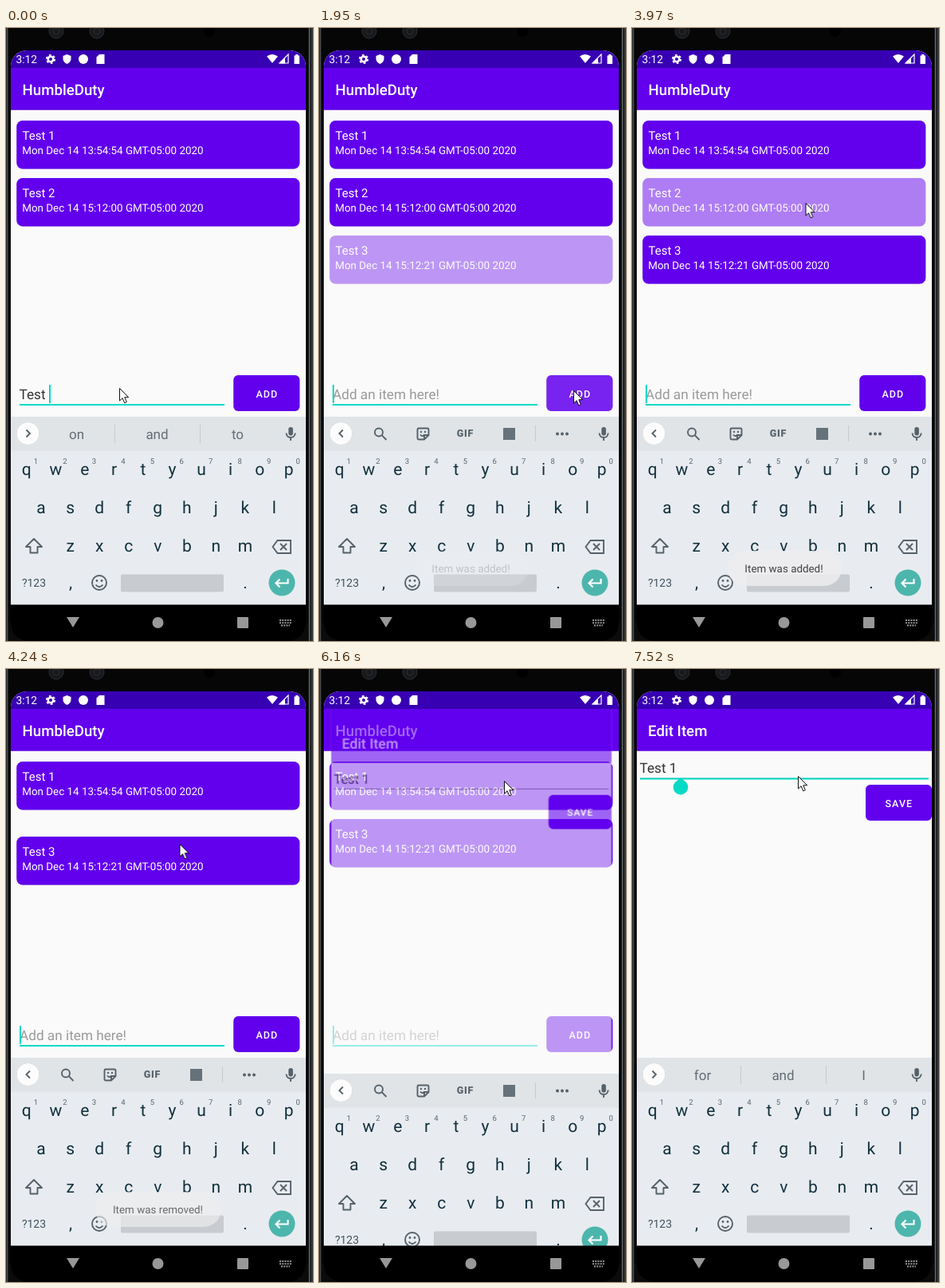
An HTML page that plays this animation: 385x768 px, repeating every 8 s.

```html
<!DOCTYPE html>
<html lang="en">
<head>
<meta charset="utf-8">
<title>Todo list demo</title>
<style>
html, body { margin: 0; width: 100%; height: 100%; overflow: hidden; background: #000; }
svg { display: block; width: 385px; height: 768px; }
text { font-family: Roboto, sans-serif; text-rendering: geometricPrecision; white-space: pre; }
.mid { text-anchor: middle; }
.bar { font-size: 18.7px; font-weight: 500; fill: #fff; }
.title { font-size: 15px; fill: #fff; }
.date { font-size: 13.42px; fill: #fff; }
.field { font-size: 17.2px; fill: #333; }
.hint { font-size: 17.2px; fill: #9a9a9a; }
.btn { font-size: 12.5px; font-weight: 500; letter-spacing: 1px; fill: #fff; }
.key { font-size: 21px; fill: #12303d; }
.num { font-size: 9.5px; fill: #56656d; }
.word { font-size: 17px; fill: #636d74; }
.toast text { font-size: 13.4px; fill: #222; }
.line { fill: none; stroke: #56626a; stroke-width: 1.9; }
.raised { filter: drop-shadow(0 .6px .7px #0004); }

[class*="go-"] { animation: 8s step-end -20ms infinite; }
.go-mouse { animation-name: mouse; }
.go-caret { animation-name: caret; }
.go-typed { visibility: hidden; animation-name: typed; }
.go-entry { animation-name: entry; }
.go-hint { opacity: 0; animation-name: hint; }
.go-press { opacity: 0; animation-name: press; }
.go-second { animation-name: second; }
.go-third { opacity: 0; transform: translateY(72px); animation-name: third; }
.go-hold { opacity: 0; animation-name: hold; }
.go-tap { opacity: 0; animation-name: tap; }
.go-added { opacity: 0; animation-name: added; }
.go-removed { opacity: 0; animation-name: removed; }
.go-words { animation-name: words; }
.go-tools { opacity: 0; animation-name: tools; }
.go-words2 { opacity: 0; animation-name: words2; }
.go-keys { animation-name: keys; }
.go-edit { opacity: 0; transform-origin: 191px 400px; animation-name: edit; }
.go-focus { opacity: 0; animation-name: focus; }
.go-caret2 { opacity: 0; animation-name: caret2; }
.go-handle { opacity: 0; animation-name: handle; }
.go-back { transform-origin: 84px 744.5px; animation-name: back; }
.go-switch { animation-name: switch; }

@keyframes mouse {
  0% { transform: translate(142px, 451px); }
  12.75% { transform: translate(205px, 456px); }
  14.25% { transform: translate(285px, 457px); }
  15.75% { transform: translate(319px, 454px); }
  34.125% { transform: translate(318px, 454px); }
  35.625% { transform: translate(302px, 408px); }
  37.125% { transform: translate(265px, 320px); }
  38.75% { transform: translate(231px, 248px); }
  40.25% { transform: translate(218px, 222px); }
  42% { transform: translate(217.5px, 219px); }
  63.25% { transform: translate(231px, 176px); }
  65.125% { transform: translate(232px, 147px); }
  66.625% { transform: translate(232px, 140px); }
  81.875% { transform: translate(224px, 147px); }
  83.5% { transform: translate(215px, 151px); }
  85.375%, to { transform: translate(208px, 134px); }
}
@keyframes caret {
  0% { opacity: 1; transform: translateX(54px); }
  5.875% { opacity: 0; transform: translateX(54px); }
  11.25% { opacity: 1; transform: translateX(64px); }
  17.5% { opacity: 0; transform: translateX(64px); }
  24.375%, 35.625%, 48.125%, 59.75%, 71.625%, to { opacity: 1; transform: translateX(17px); }
  29.125%, 42%, 54.625%, 66.625% { opacity: 0; transform: translateX(17px); }
}
@keyframes typed { 11.25% { visibility: visible; } 24.375%, to { visibility: hidden; } }
@keyframes entry { 24.375%, to { opacity: 0; } }
@keyframes hint { 24.375%, to { opacity: 1; } }
@keyframes press { 22.75% { opacity: .2; } 24.375% { opacity: .14; } 26.125% { opacity: .05; } 27.625%, to { opacity: 0; } }
@keyframes second { 49.625% { opacity: .5; } 51.5%, to { opacity: 0; } }
@keyframes third {
  24.375% { opacity: .4; transform: translateY(72px); }
  26.125% { opacity: 1; transform: translateY(72px); }
  51.5% { opacity: 1; transform: translateY(64px); }
  53% { opacity: 1; transform: translateY(22px); }
  54.625%, to { opacity: 1; transform: none; }
}
@keyframes hold {
  45.125% { opacity: .15; transform: translate(218px, 219px) scale(50); }
  46.625% { opacity: .18; transform: translate(206px, 218px) scale(125); }
  48.125% { opacity: .2; transform: translate(191px, 218px) scale(190); }
  49.625%, to { opacity: 0; }
}
@keyframes tap { 75.125% { opacity: .2; transform: translate(223px, 146px) scale(123); } 77%, to { opacity: 0; } }
@keyframes added { 24.375% { opacity: .2; } 26.125% { opacity: .65; } 27.625% { opacity: .9; } 29.125% { opacity: 1; } 49.625% { opacity: .85; } 51.5%, to { opacity: 0; } }
@keyframes removed { 51.5% { opacity: .2; } 53% { opacity: .65; } 54.625% { opacity: .9; } 56.125% { opacity: 1; } 75.125% { opacity: .5; } 77%, to { opacity: 0; } }
@keyframes words { 12.75%, to { opacity: 0; } }
@keyframes tools { 12.75% { opacity: 1; } 87.25%, to { opacity: 0; } }
@keyframes words2 { 87.25%, to { opacity: 1; } }
@keyframes keys {
  77% { transform: translateY(20px); }
  78.5% { transform: translateY(120px); }
  80.375%, 87.25% { transform: translateY(240px); }
  88.875% { transform: translateY(150px); }
  90.625% { transform: translateY(45px); }
  92.5% { transform: translateY(6px); }
  94%, to { transform: none; }
}
@keyframes edit {
  77% { opacity: .6; transform: scale(.95); }
  78.5% { opacity: 1; transform: scale(.99); }
  80.375%, to { opacity: 1; transform: none; }
}
@keyframes focus { 87.25%, to { opacity: 1; } }
@keyframes caret2 { 87.25% { opacity: 1; } 94%, to { opacity: 0; } }
@keyframes handle { 90.625%, to { opacity: 1; } }
@keyframes back { 80.375% { transform: rotate(90deg); } 88.875%, to { transform: none; } }
@keyframes switch { 80.375% { opacity: 0; } 88.875%, to { opacity: 1; } }
</style>
</head>
<body>
<svg viewBox="0 0 385 768">
  <defs>
    <clipPath id="screen"><path d="M6 768V48A20 20 0 0 1 26 28H356A20 20 0 0 1 376 48V768Z"/></clipPath>
    <clipPath id="card1"><rect x="13.3" y="116" width="355" height="60.5" rx="7.5"/></clipPath>
    <clipPath id="card2"><rect x="13.3" y="188" width="355" height="60.5" rx="7.5"/></clipPath>
  </defs>

  <!-- phone body -->
  <rect width="385" height="768" fill="#060607"/>
  <path d="M1.5 0V768" stroke="#4a4d50" stroke-width="2"/>
  <path d="M380.5 0V768" stroke="#6a6d70" stroke-width="1.5"/>
  <path d="M383.7 0V768" stroke="#36393b" stroke-width="2.6"/>
  <g fill="#17191b" stroke="#2b2e31">
    <circle cx="63" cy="4" r="9"/><circle cx="63" cy="4" r="4"/>
    <circle cx="114" cy="4" r="9"/><circle cx="114" cy="4" r="4"/>
  </g>
  <circle cx="255" cy="4" r="7" fill="#000"/>

  <g clip-path="url(#screen)">
    <!-- list screen -->
    <rect x="6" y="28" width="370" height="695" fill="#fafafa"/>
    <rect class="raised" x="6" y="50" width="370" height="52.7" fill="#6200ee"/>
    <text class="bar" x="20.5" y="84">HumbleDuty</text>
    <g id="cards"></g>
    <g clip-path="url(#card1)"><circle class="go-tap" r="1" fill="#fff"/></g>
    <g clip-path="url(#card2)"><circle class="go-hold" r="1" fill="#fff"/></g>
    <text class="field go-entry" x="16.5" y="465">Test <tspan class="go-typed">3</tspan></text>
    <text class="hint go-hint" x="17" y="465">Add an item here!</text>
    <path d="M17 472H274" stroke="#03dac5" stroke-width="2"/>
    <rect class="go-caret" y="447" width="2" height="23" fill="#03dac5"/>
    <rect class="raised" x="285.3" y="435" width="83" height="45" rx="6" fill="#6200ee"/>
    <rect class="go-press" x="285.3" y="435" width="83" height="45" rx="6" fill="#fff"/>
    <text class="btn mid" x="327.3" y="462.5">ADD</text>

    <!-- edit screen -->
    <g class="go-edit">
      <rect x="6" y="28" width="370" height="695" fill="#fafafa"/>
      <rect class="raised" x="6" y="28" width="370" height="74.7" fill="#6200ee"/>
      <text class="bar" x="20" y="84">Edit Item</text>
      <text class="field" x="9.5" y="130">Test 1</text>
      <path d="M10 137.2H372" stroke="#858585"/>
      <path class="go-focus" d="M10 137.5H372" stroke="#03dac5" stroke-width="2"/>
      <rect class="go-caret2" x="56" y="112" width="2" height="23" fill="#03dac5"/>
      <path class="go-handle" d="M61 136L68 142A9.3 9.3 0 1 1 54 142Z" fill="#03dac5"/>
      <rect class="raised" x="293" y="145" width="83" height="45" rx="6" fill="#6200ee"/>
      <text class="btn mid" x="334.8" y="172.5">SAVE</text>
    </g>

    <!-- status bar -->
    <rect x="6" y="28" width="370" height="22" fill="#3700b3"/>
    <g fill="#fff">
      <text x="12.5" y="44" font-size="13.8">3:12</text>
      <circle cx="56" cy="39" r="3.3" fill="none" stroke="#fff" stroke-width="2.6"/>
      <circle cx="56" cy="39" r="5.2" fill="none" stroke="#fff" stroke-width="1.8" stroke-dasharray="2.7 2.75"/>
      <path d="M76.5 33L81.5 35V39Q81 43 76.5 45Q72 43 71.5 39V35Z"/>
      <circle cx="97" cy="39" r="6"/>
      <path d="M117 33H123.5V45H113.5V36.5Z"/>
      <path d="M327 35.5Q333.5 30.5 341 35.5L334 44Z"/>
      <path d="M354 33V44H343Z" fill="none" stroke="#fff" stroke-width="1.2"/>
      <path d="M350 37.5V44.5H343Z"/>
      <path d="M361.5 34.5H363.2V33H366.3V34.5H368V45H361.5Z"/>
    </g>

    <!-- keyboard -->
    <g class="go-keys">
      <rect x="6" y="487" width="370" height="240" fill="#e8ecf0"/>
      <rect x="6" y="487" width="370" height="42.5" fill="#e0e4e7"/>
      <circle class="raised" cx="27.5" cy="508" r="14" fill="#fcfcfc"/>
      <g class="go-words" id="words"></g>
      <g class="go-words2" id="words2"></g>
      <g class="go-tools">
        <path class="line" d="M30 503.5L25.5 508L30 512.5"/>
        <circle class="line" cx="75" cy="506.5" r="5"/>
        <path class="line" d="M78.7 510.2L84.5 516"/>
        <path class="line" d="M125 501.5H136Q137.5 501.5 137.5 503V510L132 515.5H125Q123.5 515.5 123.5 514V503Q123.5 501.5 125 501.5ZM137 510H132V515M127 509.5Q130 513 132 509.5"/>
        <circle cx="128" cy="506" r="1.2" fill="#56626a"/><circle cx="133" cy="506" r="1.2" fill="#56626a"/>
        <text class="mid" x="183.5" y="512.3" font-size="12.5" font-weight="900" letter-spacing=".8" fill="#56626a">GIF</text>
        <rect x="231" y="501" width="15" height="15" fill="#66727a"/>
        <path d="M271.5 498V518" stroke="#c6cbcf"/>
        <g fill="#56626a"><circle cx="299" cy="508.5" r="2"/><circle cx="305" cy="508.5" r="2"/><circle cx="311" cy="508.5" r="2"/></g>
      </g>
      <rect x="354.3" y="500" width="5.6" height="10.5" rx="2.8" fill="#56626a"/>
      <path class="line" d="M351.5 507.5Q352 513 357 513Q362 513 362.7 507.5M357 513V517"/>
      <g id="letters"></g>
      <path class="line" d="M35 640L45 650H39.5V657.5H30.5V650H25Z" stroke-linejoin="round"/>
      <path class="line" d="M340.5 642H357V658H340.5L334.5 650ZM344 646L352 654M352 646L344 654"/>
      <text class="mid" x="35" y="700" font-size="14" fill="#40525c">?123</text>
      <text class="mid key" x="81" y="702" font-size="18">,</text>
      <text class="mid key" x="300" y="702">.</text>
      <circle class="line" cx="117" cy="695" r="9"/>
      <path class="line" d="M112.5 697.5Q117 703 121.5 697.5"/>
      <circle cx="114" cy="692.5" r="1.4" fill="#56626a"/><circle cx="120" cy="692.5" r="1.4" fill="#56626a"/>
      <rect x="144" y="684.5" width="129" height="22" rx="2" fill="#c8ccd1"/>
      <circle cx="346" cy="695" r="16.5" fill="#4db6ac"/>
      <path d="M353.5 690V695.5H339M343.5 690.5L338.5 695.5L343.5 700.5" fill="none" stroke="#fff" stroke-width="2.2"/>
    </g>

    <!-- toasts -->
    <g class="toast go-added">
      <rect x="120" y="655" width="143" height="44" rx="22" fill="#eeeeef"/>
      <text class="mid" x="190.5" y="682">Item was added!</text>
    </g>
    <g class="toast go-removed">
      <rect x="112" y="655" width="158" height="44" rx="22" fill="#eeeeef"/>
      <text class="mid" x="190.5" y="682">Item was removed!</text>
    </g>

    <!-- navigation bar -->
    <rect x="6" y="722.5" width="370" height="46" fill="#000"/>
    <g fill="#989898">
      <path class="go-back" d="M76 738H92L84 751Z"/>
      <circle cx="190.5" cy="745" r="7"/>
      <rect x="290" y="738" width="14" height="14" rx="1"/>
      <path class="go-switch" d="M343 742H358M343 745.3H358M345 748.6H356" fill="none" stroke="#989898" stroke-width="2" stroke-dasharray="2 1.2"/>
    </g>
  </g>
  <path d="M6 745Q7 765 27 768H3V745ZM376 745Q375 765 355 768H379V745Z" fill="#0b0b0c"/>

  <path class="go-mouse" d="M.5 .5V16L4.1 12.7L6.7 18.8L9.3 17.7L6.8 11.7H11.7Z" fill="#fff" stroke="#111"/>
</svg>
<script>
const byId = id => document.getElementById(id);
const label = (cls, x, y, s) => `<text class="${cls}" x="${x}" y="${y}">${s}</text>`;

const card = (name, time, y, cls = '') => `<g class="${cls}">
  <rect class="raised" x="13.3" y="${y}" width="355" height="60.5" rx="7.5" fill="#6200ee"/>
  ${label('title', 20.5, y + 24, name)}
  ${label('date', 20.2, y + 42, `Mon Dec 14 ${time} GMT-05:00 2020`)}</g>`;

byId('cards').innerHTML =
  card('Test 1', '13:54:54', 116) +
  card('Test 2', '15:12:00', 188, 'go-second') +
  card('Test 3', '15:12:21', 188, 'go-third');

const strip = words =>
  '<path class="line" d="M25.5 503.5L30 508L25.5 512.5"/>' +
  '<path d="M136.5 497V520M243.5 497V520" stroke="#c6cbcf"/>' +
  words.map((w, i) => label('word mid', 88.5 + i * 101, 515, w)).join('');
byId('words').innerHTML = strip(['on', 'and', 'to']);
byId('words2').innerHTML = strip(['for', 'and', 'I']);

const row = (keys, x, y) =>
  [...keys].map((k, i) => label('key mid', x + i * 36.55, y, k)).join('');
byId('letters').innerHTML =
  row('qwertyuiop', 25.8, 560) + row('asdfghjkl', 44, 608) + row('zxcvbnm', 80.6, 655.5) +
  [...'1234567890'].map((d, i) => label('num mid', 37.3 + i * 36.55, 545.5, d)).join('');
</script>
</body>
</html>
```
